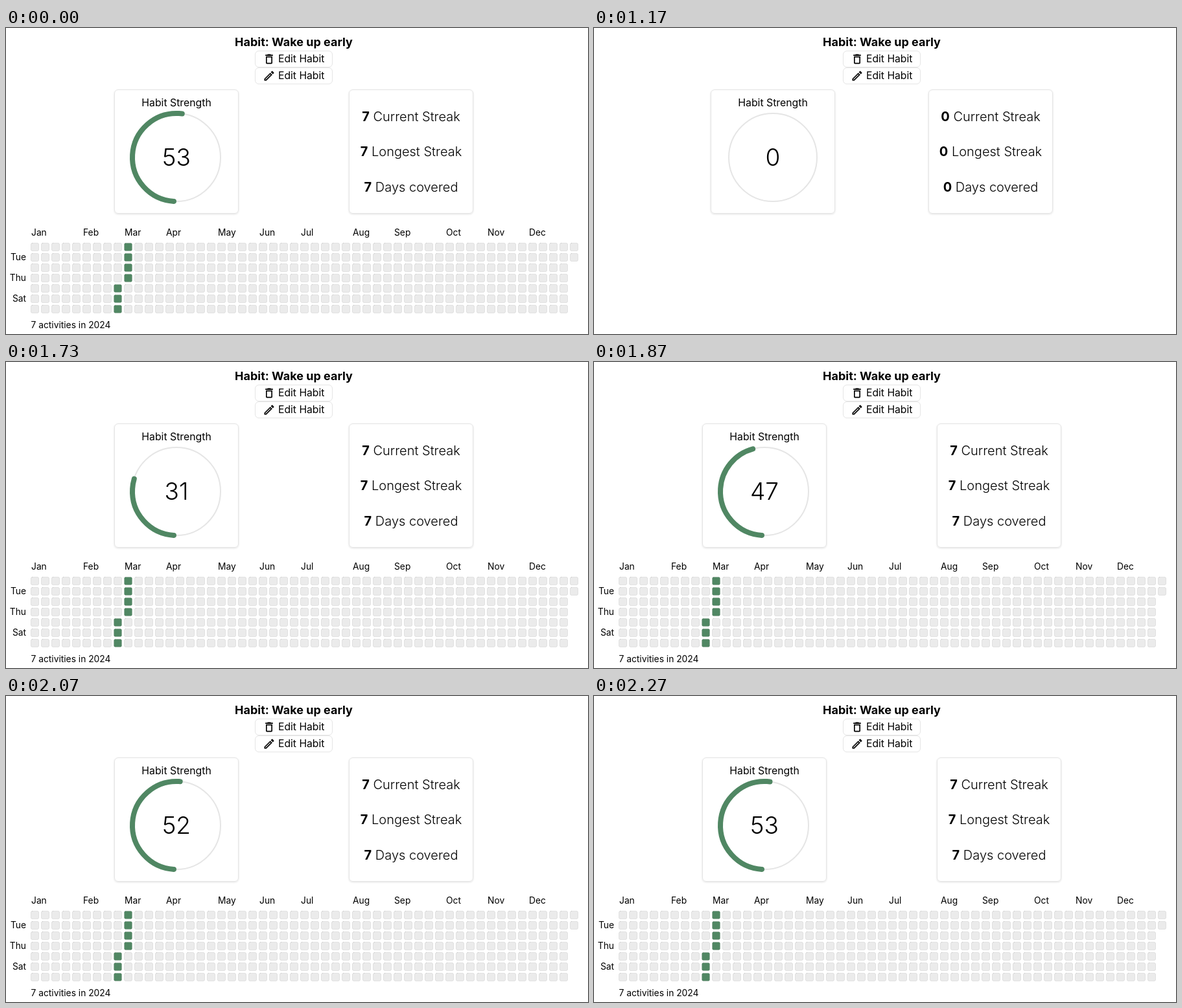
Write an HTML page with a canvas that moves like this. It is 898 px wide and 473 px high and loops after 8010 ms.

```html
<!DOCTYPE html>
<html lang="en">
<head>
<meta charset="utf-8">
<title>Habit tracker</title>
<style>
  html, body { margin: 0; width: 100%; height: 100%; overflow: hidden; background: #fff; }
  canvas { display: block; }
</style>
</head>
<body>
<canvas id="stage" width="898" height="473"></canvas>
<script>
const ctx = document.getElementById('stage').getContext('2d', { alpha: false });
const LOOP = 8010, CLEARED = 300, RING_SHOWN = 1170, LOADED = 1630;
const GREEN = '#508763', LINE = '#e5e5e5', INK = '#000';
const TARGET = 53;
const FACE = 'Inter, "Open Sans", sans-serif';

const TRASH = new Path2D('M6 19c0 1.1.9 2 2 2h8c1.1 0 2-.9 2-2V7H6v12zM8 9h8v10H8V9zm7.5-5-1-1h-5l-1 1H5v2h14V4z');
const PENCIL = new Path2D('M14.06 9.02l.92.92L5.92 19H5v-.92l9.06-9.06M17.66 3c-.25 0-.51.1-.7.29l-1.83 1.83 3.75 3.75 1.83-1.83c.39-.39.39-1.02 0-1.41l-2.34-2.34c-.2-.2-.45-.29-.71-.29zm-3.6 3.19L3 17.25V21h3.75L17.81 9.94l-3.75-3.75z');

const MONTHS = { Jan: 0, Feb: 5, Mar: 9, Apr: 13, May: 18, Jun: 22, Jul: 26, Aug: 31, Sep: 35, Oct: 40, Nov: 44, Dec: 48 };
const DAYS = { Tue: 1, Thu: 3, Sat: 5 };

function font(size, weight) {
  ctx.font = `${weight} ${size}px ${FACE}`;
}

function text(str, x, y, size, weight = 400, align = 'left') {
  font(size, weight);
  ctx.textAlign = align;
  ctx.fillStyle = INK;
  ctx.fillText(str, x, y);
}

function box(x, y, w, h, r) {
  ctx.beginPath();
  ctx.roundRect(x, y, w, h, r);
}

function button(y, icon) {
  box(384.5, y + 0.5, 119, 25, 5.5);
  ctx.lineWidth = 1;
  ctx.strokeStyle = LINE;
  ctx.stroke();
  ctx.save();
  ctx.translate(396, y + 3);
  ctx.scale(20 / 24, 20 / 24);
  ctx.fillStyle = INK;
  ctx.fill(icon);
  ctx.restore();
  text('Edit Habit', 420, y + 18, 15.7);
}

function card(cx) {
  ctx.save();
  ctx.shadowColor = 'rgba(0,0,0,.12)';
  ctx.shadowBlur = 3;
  ctx.shadowOffsetY = 1;
  ctx.fillStyle = '#fff';
  box(cx - 96, 95, 192, 192, 6);
  ctx.fill();
  ctx.restore();
  box(cx - 95.5, 95.5, 191, 191, 5.5);
  ctx.lineWidth = 1;
  ctx.strokeStyle = LINE;
  ctx.stroke();
}

function ring(cx, value) {
  const cy = 200, r = 68, cap = 4 / r;
  ctx.beginPath();
  ctx.arc(cx, cy, r, 0, 2 * Math.PI);
  ctx.lineWidth = 2;
  ctx.strokeStyle = LINE;
  ctx.stroke();
  if (value > 0) {
    const start = Math.PI / 2;
    const end = start + value / 100 * 2 * Math.PI;
    ctx.beginPath();
    ctx.arc(cx, cy, r, start + cap, Math.max(end - cap, start + cap));
    ctx.lineWidth = 8;
    ctx.lineCap = 'round';
    ctx.strokeStyle = GREEN;
    ctx.stroke();
  }
  text(Math.round(value), cx, 213, 37, 350, 'center');
}

function stat(count, label, cx, y) {
  const size = 20, rest = ' ' + label;
  font(size, 700);
  const lead = ctx.measureText(count).width;
  font(size, 350);
  const x = cx - (lead + ctx.measureText(rest).width) / 2;
  text(count, x, y, size, 700);
  text(rest, x + lead, y, size, 350);
}

function calendar() {
  const x0 = 38.5, y0 = 332.5, step = 16;
  for (const [name, col] of Object.entries(MONTHS)) text(name, 39 + col * step, 321, 13.8);
  for (const [name, row] of Object.entries(DAYS)) text(name, 31, 343 + row * step, 13.8, 400, 'right');
  ctx.lineWidth = 1;
  ctx.strokeStyle = 'rgba(0,0,0,.08)';
  // 366 days, one column per week
  for (let day = 0; day < 366; day++) {
    const col = Math.floor(day / 7), row = day % 7;
    box(x0 + col * step, y0 + row * step, 12, 12, 2);
    ctx.fillStyle = day >= 60 && day < 67 ? GREEN : '#ebebeb';
    ctx.fill();
    ctx.stroke();
  }
  text('7 activities in 2024', 38.5, 464, 13.8);
}

// Critically damped spring, already moving when the data appears
function strength(t) {
  const x = 0.01304 * (t - LOADED + 45);
  return TARGET * (1 - (1 + x) * Math.exp(-x));
}

// Time of the current 30 fps tick
function tick(t) {
  let k = Math.floor((t + 3.4) * 0.03);
  if (Math.round(k * 10 / 3) * 10 > t) k--;
  return k * 100 / 3;
}

function draw(t) {
  const loaded = t < CLEARED || t >= LOADED;
  const left = loaded ? 263 : 276, right = loaded ? 625 : 612;
  const count = loaded ? 7 : 0;

  ctx.fillStyle = '#fff';
  ctx.fillRect(0, 0, 898, 473);
  text('Habit: Wake up early', 444, 28, 18, 700, 'center');
  button(35, TRASH);
  button(61, PENCIL);

  card(left);
  text('Habit Strength', left, 121, 15.8, 400, 'center');
  if (t < CLEARED) ring(left, TARGET);
  else if (t >= LOADED) ring(left, strength(tick(t)));
  else if (t >= RING_SHOWN) ring(left, 0);

  card(right);
  ['Current Streak', 'Longest Streak', 'Days covered'].forEach((label, i) =>
    stat(count, label, right, 144 + Math.round(i * 54.4)));

  if (loaded) calendar();
}

function frame(now) {
  draw(now % LOOP);
  requestAnimationFrame(frame);
}
requestAnimationFrame(frame);
</script>
</body>
</html>
```
